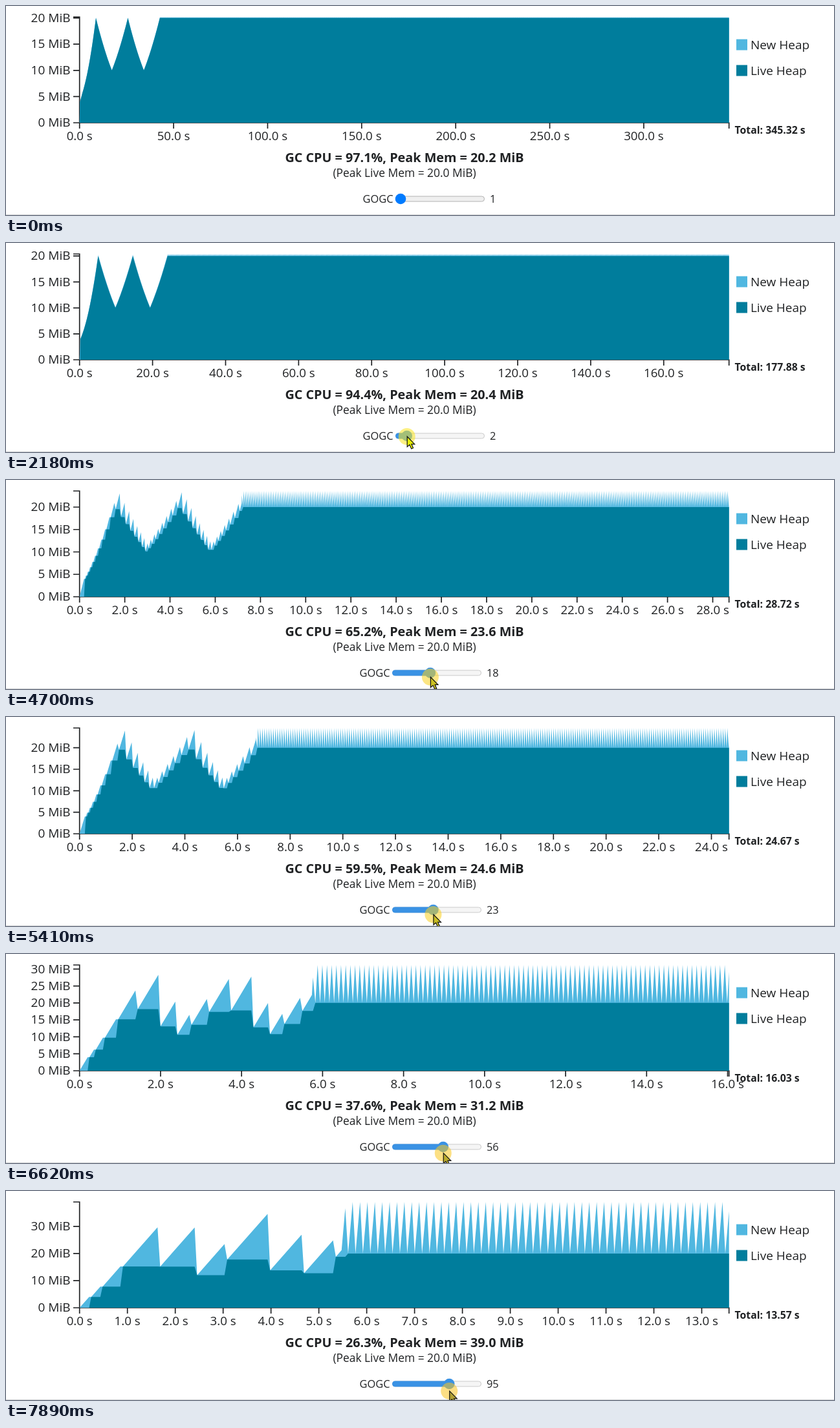
These frames come from a looping animation (1280 by 324 pixels, 8000 ms). An HTML page:

```html
<!DOCTYPE html>
<html lang="en">
<head>
<meta charset="utf-8">
<title>GOGC and heap size</title>
<style>
html, body { margin: 0; width: 100%; height: 100%; overflow: hidden; background: #fff; }
svg { display: block; width: 1280px; height: 324px; font: 19px "Open Sans", "Noto Sans", sans-serif; fill: #202224; }
.axis { fill: none; stroke: #202224; stroke-width: 1.7; }
.new { fill: #50b7e0; }
.live { fill: #007d9c; }
.mid { text-anchor: middle; }
.end { text-anchor: end; }
.bold { font-weight: 700; }
.small { font-size: 16.4px; }
</style>
</head>
<body>
<svg viewBox="0 0 1280 324">
  <g id="chart"></g>
  <rect class="new" x="1129" y="51.5" width="17" height="17"/>
  <text x="1151" y="66.5">New Heap</text>
  <rect class="live" x="1129" y="91.5" width="17" height="17"/>
  <text x="1151" y="106.5">Live Heap</text>
  <path d="M0 323.5H1280" stroke="#d6d8da"/>
  <g id="slider" class="small">
    <text x="551.5" y="305">GOGC</text>
    <rect id="track" x="602.5" y="295" width="137" height="8" rx="4"/>
    <rect id="fill" x="602" y="294.5" height="9" rx="4.5"/>
    <circle id="thumb" cy="299" r="8.3"/>
    <text id="value" x="748" y="305"></text>
  </g>
  <g id="cursor">
    <circle id="halo" r="13" opacity=".55"/>
    <path id="arrow" d="M.5 0V16L4.2 12.8 7 19 9.8 17.7 7.2 11.8H12Z" stroke="#111" stroke-width="1.2"/>
  </g>
</svg>
<script>
const $ = id => document.getElementById(id);
const LOOP = 8000, LEFT = 113.7, RIGHT = 1117.7, TOP = 17, BASE = 181;
const THUMB_MIN = 610, OCTAVE = 12.2, DIGIT_SHIFT = 5;
const ENTER = 230, ARRIVE = 750, PRESS = 1150, RHYTHM = 95;

// Pointer: time, x
const path = [
  [ENTER, 862], [ARRIVE, 612], [PRESS, 611], [1810, 617], [2090, 617], [2180, 619.7], [3750, 641.6],
  [4700, 655.9], [5910, 664.3], [6310, 674], [7180, 679.3], [7890, 685.2]
];

// The pointer advances in even steps that land on each key point
function pointerAt(t) {
  if (t < ENTER) return path[0][1];
  const i = path.findIndex(p => p[0] > t);
  if (i < 0) return path.at(-1)[1];
  const [[t0, x0], [t1, x1]] = path.slice(i - 1, i + 1);
  const steps = Math.max(1, Math.round((t1 - t0) / RHYTHM));
  return x0 + (x1 - x0) * Math.floor((t - t0) / (t1 - t0) * steps) / steps;
}

// It sweeps in along an arc, then drifts down as it drags right
function pointerY(t, x) {
  const sweep = (x - 612) / 250;
  return t < ARRIVE ? 300 + 64 * sweep * (sweep - 0.9) : 300 + 0.155 * Math.max(0, x - 620);
}

// Workload in application time (s): sizes in MiB
const liveAt = a => a < 1 ? 20 * a : a < 5 ? 10 + 10 * Math.abs((a + 1) % 2 - 1) : 20;
const appTime = alloc => alloc < 100 ? alloc / 20 : 5 + (alloc - 100) / 200;
const WORK = 1100;

function simulate(gogc) {
  const heap = [[0, 0]], live = [[0, 0]];
  let alloc = 0, mark = 0, gc = 0, peak = 0, room = 4;
  while (alloc < WORK) {
    const next = Math.min(alloc + room, WORK);
    if (alloc < 100 && next > 100) heap.push([5 + gc, mark + 100 - alloc]);
    const app = appTime(next), size = mark + next - alloc;
    heap.push([app + gc, size]);
    live.push([app + gc, mark]);
    peak = Math.max(peak, size);
    alloc = next;
    if (alloc < WORK) {
      mark = liveAt(app);
      gc += 0.04 + mark / 1024;
      heap.push([app + gc, mark]);
      live.push([app + gc, mark]);
      room = Math.max(mark * gogc / 100, 1 / 16);
    }
  }
  return { heap, live, gc, peak, total: 10 + gc };
}

function ticks(max, count) {
  const raw = max / count, pow = 10 ** Math.floor(Math.log10(raw)), err = raw / pow;
  const step = pow * (err >= 50 ** .5 ? 10 : err >= 10 ** .5 ? 5 : err >= 2 ** .5 ? 2 : 1);
  return Array.from({ length: Math.floor(max / step + 1e-6) + 1 }, (_, i) => i * step);
}

function drawChart(gogc) {
  const { heap, live, gc, peak, total } = simulate(gogc);
  const x = t => LEFT + (RIGHT - LEFT) * t / total;
  const y = m => BASE - (BASE - TOP) * m / peak;
  const area = (name, pts) => `<path class="${name}" d="M${LEFT} ${BASE}L` +
    pts.map(([t, m]) => x(t).toFixed(2) + " " + y(m).toFixed(2)).join("L") + `V${BASE}Z"/>`;
  const text = (cls, tx, ty, s, size = 19) =>
    `<text class="${cls}" x="${tx}" y="${ty}" style="font-size:${size}px">${s}</text>`;
  let axis = `M104 ${TOP}H${LEFT}V${BASE}H104M${LEFT} 190V${BASE}H${RIGHT}V190`, labels = "";
  for (const s of ticks(total, 10)) {
    axis += `M${x(s)} ${BASE}V190`;
    labels += text("mid", x(s), 208, s.toFixed(1) + " s", 18.7);
  }
  for (const m of ticks(peak, 5)) {
    axis += `M104 ${y(m)}H${LEFT}`;
    labels += text("end", 99.5, y(m) + 6.2, m + " MiB");
  }
  $("chart").innerHTML = `<path class="axis" d="${axis}"/>` + area("new", heap) + area("live", live) + labels +
    text("bold", 1126.5, 198, `Total: ${total.toFixed(2)} s`, 15.8) +
    text("bold mid", 616, 242, `GC CPU = ${(100 * gc / total).toFixed(1)}%, Peak Mem = ${peak.toFixed(1)} MiB`, 19.8) +
    text("mid", 616, 265, "(Peak Live Mem = 20.0 MiB)", 17.4);
}

function set(id, attrs) {
  for (const k in attrs) $(id).setAttribute(k, attrs[k]);
}

function drawSlider(t, px) {
  const pressed = t >= PRESS, hover = t >= ARRIVE;
  // A second digit widens the row, which moves the track under the pointer
  const wide = Math.round(2 ** ((px - THUMB_MIN) / OCTAVE)) > 9;
  const shift = pressed && wide ? DIGIT_SHIFT : 0;
  const pos = pressed ? Math.max(0, (px + shift - THUMB_MIN) / OCTAVE) : 0;
  const gogc = Math.round(2 ** pos), cx = THUMB_MIN + pos * OCTAVE;
  const blue = pressed ? "#3a92e4" : hover ? "#005cc8" : "#007bff";
  set("slider", { transform: `translate(${-shift})` });
  set("track", { fill: pressed ? "#f5f5f5" : hover ? "#e5e5e5" : "#efefef", stroke: pressed ? "#cbcbcb" : "#b2b2b2" });
  set("fill", { width: cx - 602, fill: blue });
  set("thumb", { cx, fill: blue });
  $("value").textContent = gogc;

  const warm = Math.min(1, Math.max(0, (px - 620) / 65));
  set("cursor", { transform: `translate(${px} ${pointerY(t, px)})`, visibility: t >= ENTER ? "visible" : "hidden" });
  set("halo", { visibility: pressed ? "inherit" : "hidden", fill: `hsl(${54 - 9 * warm} 95% 55%)` });
  set("arrow", { fill: `hsl(${62 - 10 * warm} ${95 - 40 * warm}% ${48 - 3 * warm}%)` });
  return gogc;
}

let start, drawn;
function frame(now) {
  start ??= now;
  const t = (now - start) % LOOP;
  const gogc = drawSlider(t, pointerAt(t));
  if (gogc !== drawn) drawChart(drawn = gogc);
  requestAnimationFrame(frame);
}
requestAnimationFrame(frame);
</script>
</body>
</html>
```
